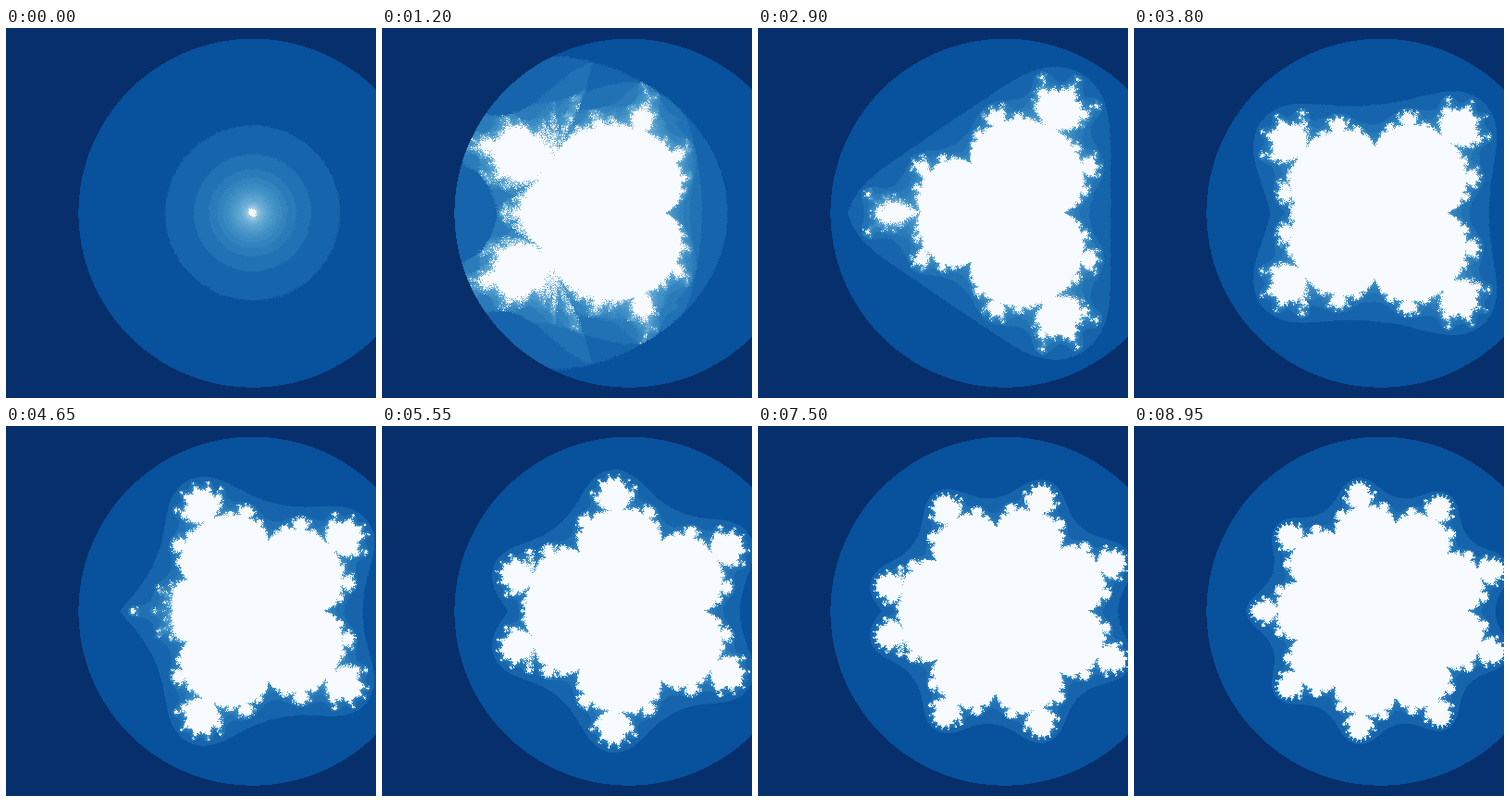
These frames come from a looping animation (400 by 400 pixels, 9 s). An HTML page without scripts:

```html
<!DOCTYPE html>
<html lang="en">
<head>
<meta charset="utf-8">
<title>Multibrot sweep</title>
<style>
/* The exponent p of z -> z^p + c */
@property --p { syntax: "<number>"; inherits: false; initial-value: 1; }
@keyframes sweep { from { --p: 1; } to { --p: 10; } }

html, body { margin: 0; width: 100%; height: 100%; overflow: hidden; background: #08306b; }
body { position: relative; }
svg { position: absolute; }
filter { color-interpolation-filters: sRGB; }

/* Paints z^p at every z: red = real part, green = imaginary part, blue = still inside the bailout circle.
   The filter then uses it as a lookup for each iteration. Values beyond 2.7 always escape. */
.plane {
  --at: 267.92px 201.17px;
  --r: calc(133.3px * pow(2.7, 1 / var(--p)));
  --e: calc(3 / var(--p));
  position: absolute; left: 0; top: 0; width: 460px; height: 400px;
  animation: sweep 9s steps(180) infinite;
  filter: url(#iterate);
  background:
    radial-gradient(circle at var(--at), transparent 188.5px, #000 188.5px),
    radial-gradient(circle at var(--at),
      rgb(128 128 255) 0px,
      rgb(128 128 255 / .9999) calc(var(--r) * pow(.05, var(--e))),
      rgb(128 128 255 / .999) calc(var(--r) * pow(.1, var(--e))),
      rgb(128 128 255 / .9966) calc(var(--r) * pow(.15, var(--e))),
      rgb(128 128 255 / .992) calc(var(--r) * pow(.2, var(--e))),
      rgb(128 128 255 / .9844) calc(var(--r) * pow(.25, var(--e))),
      rgb(128 128 255 / .973) calc(var(--r) * pow(.3, var(--e))),
      rgb(128 128 255 / .9571) calc(var(--r) * pow(.35, var(--e))),
      rgb(128 128 255 / .936) calc(var(--r) * pow(.4, var(--e))),
      rgb(128 128 255 / .9089) calc(var(--r) * pow(.45, var(--e))),
      rgb(128 128 255 / .875) calc(var(--r) * pow(.5, var(--e))),
      rgb(128 128 255 / .8336) calc(var(--r) * pow(.55, var(--e))),
      rgb(128 128 255 / .784) calc(var(--r) * pow(.6, var(--e))),
      rgb(128 128 255 / .7254) calc(var(--r) * pow(.65, var(--e))),
      rgb(128 128 255 / .657) calc(var(--r) * pow(.7, var(--e))),
      rgb(128 128 255 / .5781) calc(var(--r) * pow(.75, var(--e))),
      rgb(128 128 255 / .488) calc(var(--r) * pow(.8, var(--e))),
      rgb(128 128 255 / .3859) calc(var(--r) * pow(.85, var(--e))),
      rgb(128 128 255 / .271) calc(var(--r) * pow(.9, var(--e))),
      rgb(128 128 255 / .1426) calc(var(--r) * pow(.95, var(--e))),
      rgb(128 128 255 / 0) var(--r),
      rgb(0 0 255) var(--r)),
    repeating-conic-gradient(from 270deg at var(--at),
      #ff80ff 180deg, #fba1ff, #eec0ff, #dadaff, #c0eeff, #a1fbff,
      #80ffff, #5ffbff, #40eeff, #26daff, #12c0ff, #05a1ff,
      #0180ff, #055fff, #1240ff, #2626ff, #4012ff, #5f05ff,
      #8001ff, #a105ff, #c012ff, #da26ff, #ee40ff, #fb5fff,
      #ff80ff calc(180deg + 360deg / var(--p)));
}
</style>
</head>
<body>
<svg width="0" height="0">
<filter id="iterate" x="0" y="0" width="1" height="1">
<!-- Each displacement is one step: look up z^p at (pixel + previous value) -->
<feFlood flood-color="#808080" result="z0"/>
<feDisplacementMap in="SourceGraphic" in2="z0" scale="722.7" xChannelSelector="R" yChannelSelector="G" result="z1"/>
<feDisplacementMap in="SourceGraphic" in2="z1" scale="722.7" xChannelSelector="R" yChannelSelector="G" result="z2"/>
<feDisplacementMap in="SourceGraphic" in2="z2" scale="722.7" xChannelSelector="R" yChannelSelector="G" result="z3"/>
<feDisplacementMap in="SourceGraphic" in2="z3" scale="722.7" xChannelSelector="R" yChannelSelector="G" result="z4"/>
<feDisplacementMap in="SourceGraphic" in2="z4" scale="722.7" xChannelSelector="R" yChannelSelector="G" result="z5"/>
<feDisplacementMap in="SourceGraphic" in2="z5" scale="722.7" xChannelSelector="R" yChannelSelector="G" result="z6"/>
<feDisplacementMap in="SourceGraphic" in2="z6" scale="722.7" xChannelSelector="R" yChannelSelector="G" result="z7"/>
<feDisplacementMap in="SourceGraphic" in2="z7" scale="722.7" xChannelSelector="R" yChannelSelector="G" result="z8"/>
<feDisplacementMap in="SourceGraphic" in2="z8" scale="722.7" xChannelSelector="R" yChannelSelector="G" result="z9"/>
<feDisplacementMap in="SourceGraphic" in2="z9" scale="722.7" xChannelSelector="R" yChannelSelector="G" result="z10"/>
<feDisplacementMap in="SourceGraphic" in2="z10" scale="722.7" xChannelSelector="R" yChannelSelector="G" result="z11"/>
<feDisplacementMap in="SourceGraphic" in2="z11" scale="722.7" xChannelSelector="R" yChannelSelector="G" result="z12"/>
<feDisplacementMap in="SourceGraphic" in2="z12" scale="722.7" xChannelSelector="R" yChannelSelector="G" result="z13"/>
<feDisplacementMap in="SourceGraphic" in2="z13" scale="722.7" xChannelSelector="R" yChannelSelector="G" result="z14"/>
<feDisplacementMap in="SourceGraphic" in2="z14" scale="722.7" xChannelSelector="R" yChannelSelector="G" result="z15"/>
<feDisplacementMap in="SourceGraphic" in2="z15" scale="722.7" xChannelSelector="R" yChannelSelector="G" result="z16"/>
<feDisplacementMap in="SourceGraphic" in2="z16" scale="722.7" xChannelSelector="R" yChannelSelector="G" result="z17"/>
<feDisplacementMap in="SourceGraphic" in2="z17" scale="722.7" xChannelSelector="R" yChannelSelector="G" result="z18"/>
<feDisplacementMap in="SourceGraphic" in2="z18" scale="722.7" xChannelSelector="R" yChannelSelector="G" result="z19"/>
<feDisplacementMap in="SourceGraphic" in2="z19" scale="722.7" xChannelSelector="R" yChannelSelector="G" result="z20"/>
<feDisplacementMap in="SourceGraphic" in2="z20" scale="722.7" xChannelSelector="R" yChannelSelector="G" result="z21"/>
<feDisplacementMap in="SourceGraphic" in2="z21" scale="722.7" xChannelSelector="R" yChannelSelector="G" result="z22"/>
<feDisplacementMap in="SourceGraphic" in2="z22" scale="722.7" xChannelSelector="R" yChannelSelector="G" result="z23"/>
<feDisplacementMap in="SourceGraphic" in2="z23" scale="722.7" xChannelSelector="R" yChannelSelector="G" result="z24"/>
<feDisplacementMap in="SourceGraphic" in2="z24" scale="722.7" xChannelSelector="R" yChannelSelector="G" result="z25"/>
<feDisplacementMap in="SourceGraphic" in2="z25" scale="722.7" xChannelSelector="R" yChannelSelector="G" result="z26"/>
<feDisplacementMap in="SourceGraphic" in2="z26" scale="722.7" xChannelSelector="R" yChannelSelector="G" result="z27"/>
<feDisplacementMap in="SourceGraphic" in2="z27" scale="722.7" xChannelSelector="R" yChannelSelector="G" result="z28"/>
<feDisplacementMap in="SourceGraphic" in2="z28" scale="722.7" xChannelSelector="R" yChannelSelector="G" result="z29"/>
<feDisplacementMap in="SourceGraphic" in2="z29" scale="722.7" xChannelSelector="R" yChannelSelector="G" result="z30"/>
<feDisplacementMap in="SourceGraphic" in2="z30" scale="722.7" xChannelSelector="R" yChannelSelector="G" result="z31"/>
<feDisplacementMap in="SourceGraphic" in2="z31" scale="722.7" xChannelSelector="R" yChannelSelector="G" result="z32"/>
<feDisplacementMap in="SourceGraphic" in2="z32" scale="722.7" xChannelSelector="R" yChannelSelector="G" result="z33"/>
<feDisplacementMap in="SourceGraphic" in2="z33" scale="722.7" xChannelSelector="R" yChannelSelector="G" result="z34"/>
<feDisplacementMap in="SourceGraphic" in2="z34" scale="722.7" xChannelSelector="R" yChannelSelector="G" result="z35"/>
<feDisplacementMap in="SourceGraphic" in2="z35" scale="722.7" xChannelSelector="R" yChannelSelector="G" result="z36"/>
<feDisplacementMap in="SourceGraphic" in2="z36" scale="722.7" xChannelSelector="R" yChannelSelector="G" result="z37"/>
<feDisplacementMap in="SourceGraphic" in2="z37" scale="722.7" xChannelSelector="R" yChannelSelector="G" result="z38"/>
<feDisplacementMap in="SourceGraphic" in2="z38" scale="722.7" xChannelSelector="R" yChannelSelector="G" result="z39"/>
<feDisplacementMap in="SourceGraphic" in2="z39" scale="722.7" xChannelSelector="R" yChannelSelector="G" result="z40"/>
<feDisplacementMap in="SourceGraphic" in2="z40" scale="722.7" xChannelSelector="R" yChannelSelector="G" result="z41"/>
<feDisplacementMap in="SourceGraphic" in2="z41" scale="722.7" xChannelSelector="R" yChannelSelector="G" result="z42"/>
<feDisplacementMap in="SourceGraphic" in2="z42" scale="722.7" xChannelSelector="R" yChannelSelector="G" result="z43"/>
<feDisplacementMap in="SourceGraphic" in2="z43" scale="722.7" xChannelSelector="R" yChannelSelector="G" result="z44"/>
<feDisplacementMap in="SourceGraphic" in2="z44" scale="722.7" xChannelSelector="R" yChannelSelector="G" result="z45"/>
<feDisplacementMap in="SourceGraphic" in2="z45" scale="722.7" xChannelSelector="R" yChannelSelector="G" result="z46"/>
<feDisplacementMap in="SourceGraphic" in2="z46" scale="722.7" xChannelSelector="R" yChannelSelector="G" result="z47"/>
<feDisplacementMap in="SourceGraphic" in2="z47" scale="722.7" xChannelSelector="R" yChannelSelector="G" result="z48"/>
<feDisplacementMap in="SourceGraphic" in2="z48" scale="722.7" xChannelSelector="R" yChannelSelector="G" result="z49"/>
<feDisplacementMap in="SourceGraphic" in2="z49" scale="722.7" xChannelSelector="R" yChannelSelector="G" result="z50"/>
<feDisplacementMap in="SourceGraphic" in2="z50" scale="722.7" xChannelSelector="R" yChannelSelector="G" result="z51"/>
<feDisplacementMap in="SourceGraphic" in2="z51" scale="722.7" xChannelSelector="R" yChannelSelector="G" result="z52"/>

<!-- Sum the surviving steps in blue, so that blue = log256(escape count) -->
<feFlood flood-color="#000"/>
<feComposite in2="z1" operator="arithmetic" k2="1" k3=".125"/>
<feComposite in2="z2" operator="arithmetic" k2="1" k3=".0731"/>
<feComposite in2="z3" operator="arithmetic" k2="1" k3=".0519"/>
<feComposite in2="z4" operator="arithmetic" k2="1" k3=".0402"/>
<feComposite in2="z5" operator="arithmetic" k2="1" k3=".0329"/>
<feComposite in2="z6" operator="arithmetic" k2="1" k3=".0278"/>
<feComposite in2="z7" operator="arithmetic" k2="1" k3=".0241"/>
<feComposite in2="z8" operator="arithmetic" k2="1" k3=".0212"/>
<feComposite in2="z9" operator="arithmetic" k2="1" k3=".019"/>
<feComposite in2="z10" operator="arithmetic" k2="1" k3=".0172"/>
<feComposite in2="z11" operator="arithmetic" k2="1" k3=".0157"/>
<feComposite in2="z12" operator="arithmetic" k2="1" k3=".0144"/>
<feComposite in2="z14" operator="arithmetic" k2="1" k3=".0258"/>
<feComposite in2="z17" operator="arithmetic" k2="1" k3=".0328"/>
<feComposite in2="z21" operator="arithmetic" k2="1" k3=".0362"/>
<feComposite in2="z27" operator="arithmetic" k2="1" k3=".0435"/>
<feComposite in2="z36" operator="arithmetic" k2="1" k3=".0503"/>
<feComposite in2="z52" operator="arithmetic" k2="1" k3=".37"/>

<!-- Dark blue to white palette -->
<feColorMatrix values="0 0 1 0 0  0 0 1 0 0  0 0 1 0 0  0 0 0 0 1"/>
<feComponentTransfer>
  <feFuncR type="table" tableValues=".031 .031 .129 .259 .42 .62 .776 .871 .969"/>
  <feFuncG type="table" tableValues=".188 .318 .443 .573 .682 .792 .859 .922 .984"/>
  <feFuncB type="table" tableValues=".42 .612 .71 .776 .839 .882 .937 .969 1"/>
</feComponentTransfer>
</filter>
</svg>
<div class="plane"></div>
</body>
</html>
```
